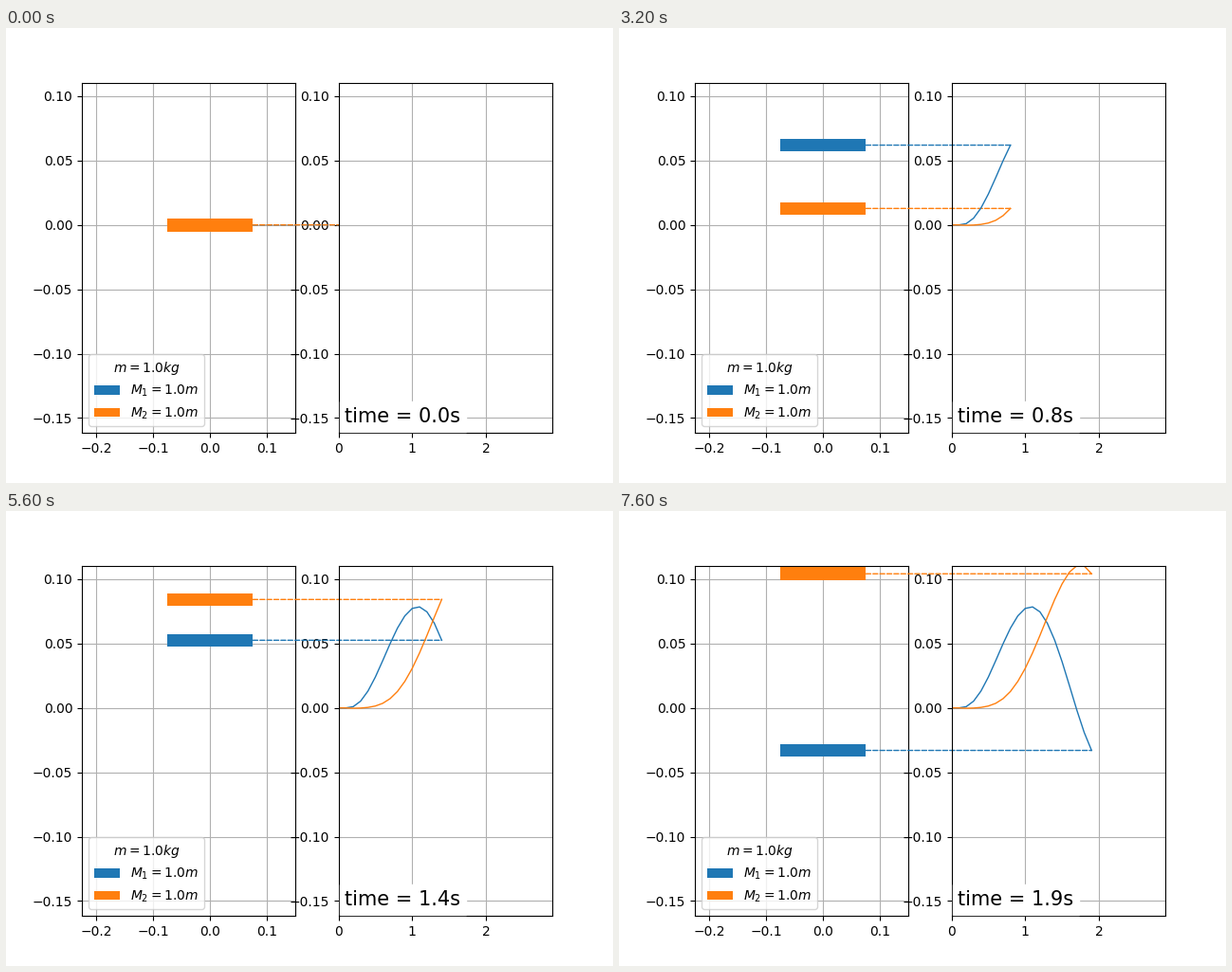
Write a matplotlib script that moves like this. It is 640 px wide and 480 px high and loops after 8 s.

```python
import numpy as np
import matplotlib.pyplot as plt
from matplotlib.animation import FuncAnimation
from matplotlib.patches import ConnectionPatch, Rectangle

DT = 0.1
FRAMES = 20
INTERVAL = 400
WIDTH, HEIGHT = 0.15, 0.01

# Each mass rests until START, then follows a smooth curve through seven key heights.
START, END = 0.1, 1.9
KEY_HEIGHTS = {
    "$M_1 = 1.0m$": (0, .0131, .0499, .0773, .0658, .0173, -.0330),
    "$M_2 = 1.0m$": (0, .0004, .0072, .0307, .0705, .1055, .1042),
}
times = np.arange(FRAMES) * DT


def motion(keys):
    key_times = np.linspace(START, END, len(keys))
    curve = np.polyfit(key_times, keys, len(keys) - 1)
    return np.polyval(curve, np.maximum(times, START))


fig, (ax_body, ax_trace) = plt.subplots(1, 2, figsize=(6.4, 4.8), dpi=100)
for ax in (ax_body, ax_trace):
    ax.set_ylim(-0.16161, 0.11056)
    ax.set_axisbelow(True)
    ax.grid()
ax_body.set_xlim(-0.225, 0.15)
ax_trace.set_xlim(0, 2.9)


def add_mass(label, keys, color):
    bar = Rectangle((-WIDTH / 2, -HEIGHT / 2), WIDTH, HEIGHT,
                    color=color, lw=0, label=label, zorder=3)
    ax_body.add_patch(bar)
    trace, = ax_trace.plot([], [], color=color, lw=1)
    link = ConnectionPatch((WIDTH / 2, 0), (0, 0), "data", "data",
                           axesA=ax_body, axesB=ax_trace,
                           color=color, ls="--", lw=1, annotation_clip=False)
    ax_trace.add_artist(link)
    return motion(keys), bar, trace, link


masses = [add_mass(label, keys, color)
          for (label, keys), color in zip(KEY_HEIGHTS.items(), ("C0", "C1"))]
ax_body.legend(loc="lower left", title="$m = 1.0kg$")
clock = ax_trace.text(0.03, 0.03, "", transform=ax_trace.transAxes, fontsize=15,
                      bbox=dict(facecolor="white", edgecolor="white"))


def update(i):
    for heights, bar, trace, link in masses:
        y = heights[i]
        bar.set_y(y - HEIGHT / 2)
        trace.set_data(times[:i + 1], heights[:i + 1])
        link.xy1 = (WIDTH / 2, y)
        link.xy2 = (times[i], y)
    clock.set_text(f"time = {times[i]:.1f}s")
    return []


anim = FuncAnimation(fig, update, frames=FRAMES, interval=INTERVAL,
                     repeat=True, repeat_delay=0)
plt.show()
```
